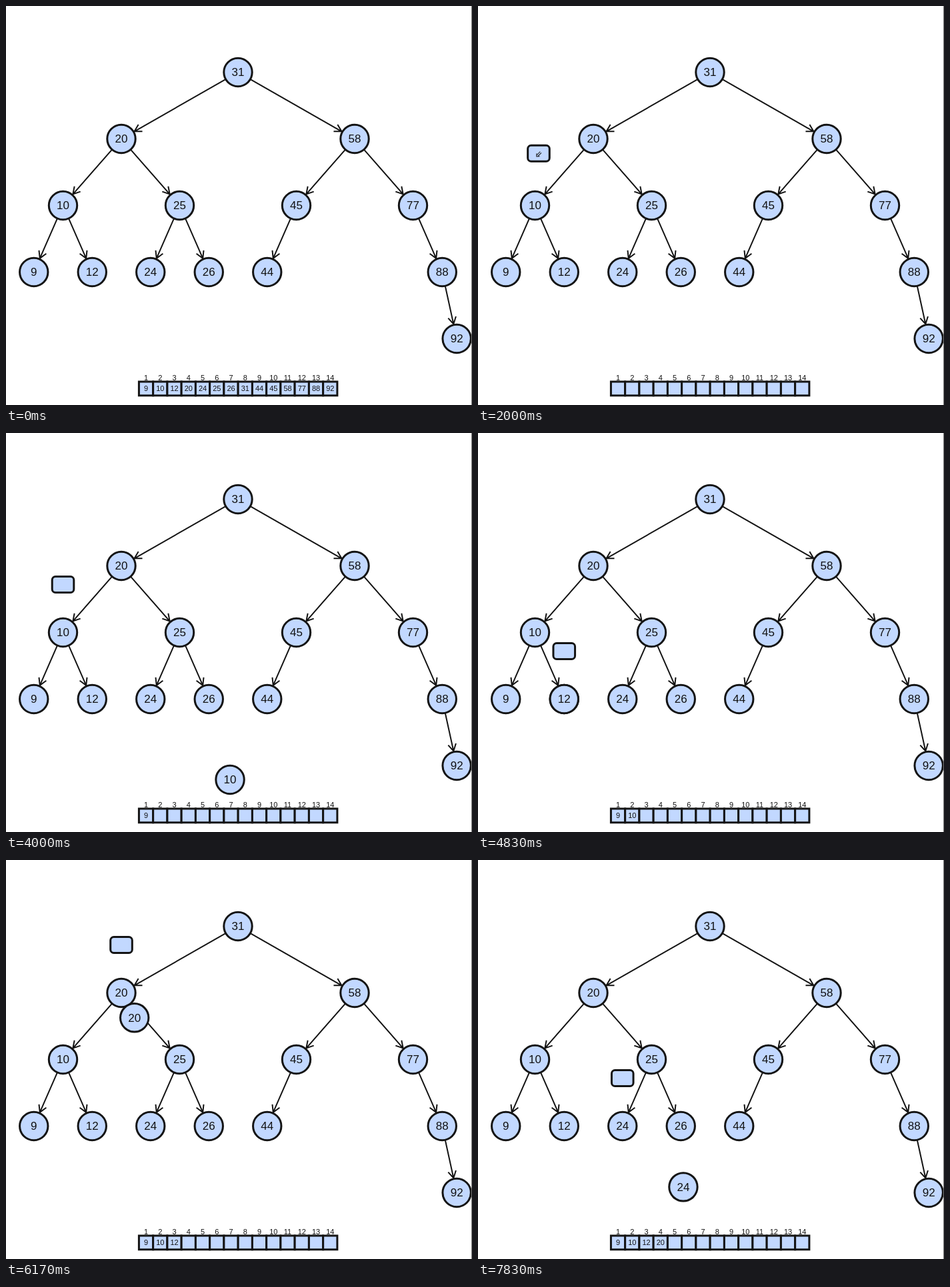
An HTML page for the animation above (8000 ms loop, 699 by 599 pixels).

```html
<!DOCTYPE html>
<html lang="en">
<head>
<meta charset="utf-8">
<title>In-order traversal</title>
<style>
  html, body { margin: 0; width: 100%; height: 100%; overflow: hidden; background: #fff; }
  svg { display: block; width: 699px; height: 599px; }
  text { font-family: "Liberation Sans", Arial, sans-serif; text-anchor: middle; fill: #111; }
  .node text { font-size: 17px; }
  .small { font-size: 11px; }
  .shape { fill: #c2d8ff; stroke: #141414; stroke-width: 3; }
  .line { fill: none; stroke: #141414; stroke-width: 2; }
  .glyph { fill: none; stroke: #141414; stroke-width: 1; }
</style>
</head>
<body>
<svg id="stage" viewBox="0 0 699 599"></svg>
<script>
const LOOP = 8000, FPS = 6, MOVE = 400, START = 1300;
const OUT = { x: 348, y: 531 };
const stage = document.getElementById('stage');

function add(parent, tag, attrs, text) {
  const el = document.createElementNS('http://www.w3.org/2000/svg', tag);
  for (const key in attrs) el.setAttribute(key, attrs[key]);
  if (text !== undefined) el.textContent = text;
  return parent.appendChild(el);
}
const place = (el, p) => el.setAttribute('transform', `translate(${p.x} ${p.y})`);
const show = (el, on) => el.setAttribute('visibility', on ? 'visible' : 'hidden');

// Build the search tree by inserting the keys in order
const nodes = {};
const edges = [];
for (const key of [31, 20, 58, 10, 25, 45, 77, 9, 12, 24, 26, 44, 88, 92]) {
  let x = 348, y = 99.5, step = 175, parent = null, next = nodes[31];
  while (next) {
    parent = next;
    const side = key < parent.key ? 'left' : 'right';
    x += side === 'left' ? -step : step;
    y += 100;
    step /= 2;
    next = parent[side];
    if (!next) parent[side] = { key, x, y };
  }
  nodes[key] = { key, x, y };
  if (parent) {
    const side = key < parent.key ? 'left' : 'right';
    nodes[key] = parent[side];
    edges.push([parent, nodes[key]]);
  }
}

function drawEdge([a, b]) {
  const angle = Math.atan2(b.y - a.y, b.x - a.x);
  const polar = (p, r, t) => `${p.x + r * Math.cos(t)} ${p.y + r * Math.sin(t)}`;
  const tip = { x: b.x - 22.5 * Math.cos(angle), y: b.y - 22.5 * Math.sin(angle) };
  const arm = s => polar(tip, -12, angle + s * 0.52);
  add(stage, 'path', {
    class: 'line',
    d: `M${polar(a, 22, angle)}L${tip.x} ${tip.y}M${arm(1)}L${tip.x} ${tip.y}L${arm(-1)}`
  });
}

function drawNode(p, label) {
  const g = add(stage, 'g', { class: 'node' });
  add(g, 'circle', { class: 'shape', r: 21.2 });
  const text = add(g, 'text', { y: 5.7 }, label);
  place(g, p);
  return { g, text };
}

edges.forEach(drawEdge);
Object.values(nodes).forEach(n => drawNode(n, n.key));

// Result array
const sorted = Object.keys(nodes).map(Number).sort((a, b) => a - b);
const cells = sorted.map((key, i) => {
  const x = 210 + 21.25 * i;
  add(stage, 'rect', { class: 'shape', x: x - 10.6, y: 564, width: 21.25, height: 20.8, 'stroke-width': 2.6 });
  add(stage, 'text', { class: 'small', x, y: 562.3 }, i + 1);
  return add(stage, 'text', { class: 'small', x, y: 578.3 }, key);
});

// Travelling marker with its direction arrow, and the copied node
const marker = add(stage, 'g', {});
add(marker, 'rect', { class: 'shape', x: -16.3, y: -12, width: 32.6, height: 24, rx: 5 });
const glyph = add(marker, 'path', { class: 'glyph', d: 'M-1.2 4.5V-2.6M1.2 4.5V-2.6M-3.2-1L0-4.5L3.2-1' });
const copy = drawNode(OUT, '');
add(stage, 'rect', { x: 698, y: 0, width: 1, height: 599, fill: '#777' });

const UP = 0, RIGHT = 135, LEFT = 225;
// Start time, from, to, arrow angle, whether the key is written out on arrival
const moves = [
  [START, 31, 20, LEFT, false],
  [1700, 20, 10, LEFT, false],
  [2100, 10, 9, LEFT, true],
  [3290, 9, 10, UP, true],
  [4430, 10, 12, RIGHT, true],
  [5645, 12, 20, UP, true],
  [6803, 20, 25, RIGHT, false],
  [7203, 25, 24, LEFT, true]
].map(([at, from, to, turn, visit]) => ({ at, from: nodes[from], to: nodes[to], turn, visit }));
const WRITE_LEAD = 90;

function ease(t) {
  t = Math.min(1, Math.max(0, t));
  return t < 0.5 ? 4 * t ** 3 : 1 - 4 * (1 - t) ** 3;
}
const mix = (a, b, u) => ({ x: a.x + (b.x - a.x) * u, y: a.y + (b.y - a.y) * u });

function draw(time) {
  const running = time >= START;
  show(marker, running);
  show(glyph, false);
  show(copy.g, false);
  if (!running) {
    cells.forEach(c => show(c, true));
    return;
  }

  const i = moves.findLastIndex(m => time >= m.at);
  const move = moves[i], next = moves[i + 1];
  const landed = move.at + MOVE;
  const written = next && move.visit ? next.at - WRITE_LEAD : Infinity;
  const spot = mix(move.from, move.to, ease((time - move.at) / MOVE));
  place(marker, { x: spot.x, y: spot.y - 72 });

  const done = time >= written;
  if (time < landed || done) {
    const turn = done ? next.turn : move.turn;
    show(glyph, true);
    glyph.setAttribute('transform', `translate(0 1.5) rotate(${turn})`);
  }
  if (move.visit && time >= landed && !done) {
    show(copy.g, true);
    copy.text.textContent = move.to.key;
    place(copy.g, mix(move.to, OUT, ease((time - landed) / MOVE)));
  }

  const count = moves.slice(0, i).filter(m => m.visit).length + (done ? 1 : 0);
  cells.forEach((c, n) => show(c, n < count));
}

const begin = performance.now();
function tick() {
  const time = (performance.now() - begin) % LOOP;
  draw(Math.floor(time * FPS / 1000 + 0.03) * 1000 / FPS);
  requestAnimationFrame(tick);
}
tick();
</script>
</body>
</html>
```
